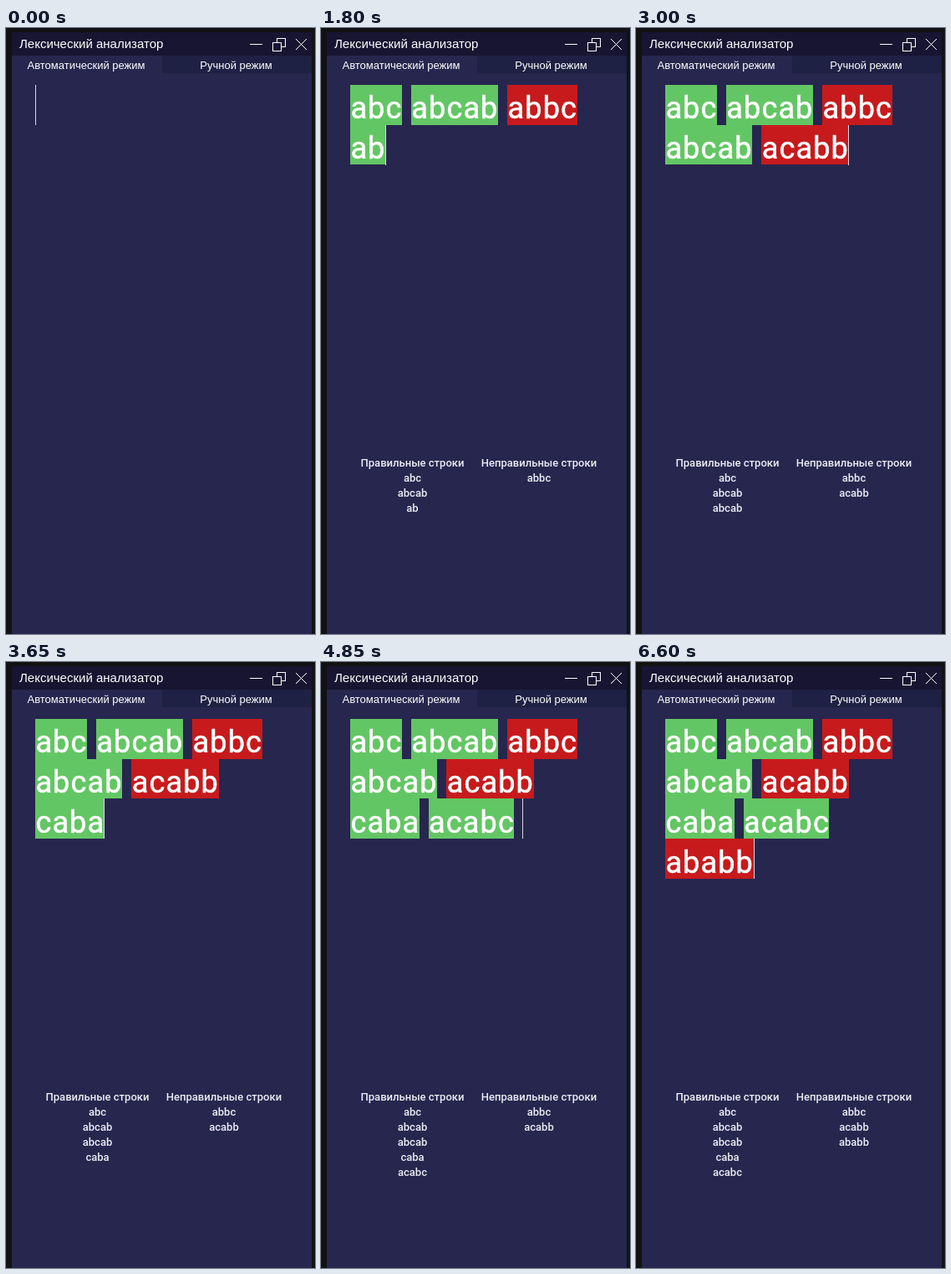
Write an HTML page that moves like this. It is 370 px wide and 724 px high and loops after 6.7 s.

```html
<!DOCTYPE html>
<html lang="ru">
<head>
<meta charset="utf-8">
<title>Лексический анализатор</title>
<style>
  html, body { margin: 0; width: 100%; height: 100%; overflow: hidden; background: #121214; }
  svg { display: block; }
  text { fill: #fff; }
  .ui { font-family: "Liberation Sans", Arial, sans-serif; }
  .word { font: 400 36px Roboto, sans-serif; letter-spacing: 1.15px; stroke: #fff; stroke-width: .6px; }
  .list text { font: 500 13px Roboto, sans-serif; text-anchor: middle; fill: #ececf4; }
  .icon { fill: none; stroke: #fff; shape-rendering: crispEdges; }
</style>
</head>
<body>
<svg width="370" height="724" viewBox="0 0 370 724">
  <rect width="370" height="724" fill="#121214"/>
  <rect x="7" y="5" width="359" height="719" fill="#27264e"/>
  <rect x="7" y="5" width="359" height="28" fill="#171531"/>
  <rect x="187" y="33" width="179" height="21" fill="#1e2143"/>
  <g class="ui">
    <text x="16" y="24" font-size="15">Лексический анализатор</text>
    <text x="96" y="49" font-size="13" text-anchor="middle">Автоматический режим</text>
    <text x="275.5" y="49" font-size="13" text-anchor="middle">Ручной режим</text>
  </g>
  <path class="icon" d="M292 19.5H307M319.5 17.5h10v10h-10zM324.5 17.5v-5h10v10h-5"/>
  <path d="M347 13l13 13M360 13l-13 13" fill="none" stroke="#fff"/>
  <g id="editor"></g>
  <g id="lists" class="list"></g>
  <rect id="caret" width="1" height="48" fill="#d8d8e0"/>
</svg>
<script>
const LOOP = 6700;
const SCRIPT = "abc abcab abbc abcab acabb caba acabc ababb";
const ADVANCE = { a: 20.8, b: 21.6, c: 19.5, " ": 11 };
const LEFT = 35, RIGHT = 338, TOP = 68, ROW = 47.7;
// Typing bursts: [first key time, interval, key count]
const BURSTS = [[50, 105, 17], [1860, 130, 9], [3050, 150, 12], [5050, 70, 2], [5850, 180, 3]];
const KEY_TIMES = BURSTS.flatMap(([start, step, count]) =>
  Array.from({ length: count }, (_, i) => start + i * step));

const byId = id => document.getElementById(id);
const editor = byId("editor"), lists = byId("lists"), caret = byId("caret");
const widthOf = word => [...word].reduce((sum, ch) => sum + ADVANCE[ch], 0);
const isValid = word => !word.includes("bb");

function layout(typed) {
  const words = [];
  let x = LEFT, row = 0;
  typed.split(" ").forEach((text, i) => {
    if (i) x += ADVANCE[" "];
    const width = widthOf(text);
    if (x + width > RIGHT) { x = LEFT; row++; }
    if (text) words.push({ text, x, y: TOP + row * ROW, width });
    x += width;
  });
  return { words, x, y: TOP + row * ROW };
}

function wordMarkup({ text, x, y, width }) {
  const left = Math.round(x), top = Math.round(y);
  const w = Math.round(x + width) - left, h = Math.round(y + ROW) - top;
  const color = isValid(text) ? "#63c664" : "#c71a1c";
  return `<rect x="${left}" y="${top}" width="${w}" height="${h}" fill="${color}"/>` +
    `<text class="word" x="${x + 0.4}" y="${y + 40.4}">${text}</text>`;
}

const column = (x, title, words) => [title, ...words]
  .map((text, i) => `<text x="${x}" y="${524 + 18 * i}">${text}</text>`).join("");

let shown = -1;
function draw(time) {
  const count = KEY_TIMES.filter(t => t <= time).length;
  if (count !== shown) {
    shown = count;
    const { words, x, y } = layout(SCRIPT.slice(0, count));
    const texts = words.map(word => word.text);
    editor.innerHTML = words.map(wordMarkup).join("");
    lists.innerHTML = count
      ? column(109.5, "Правильные строки", texts.filter(isValid)) +
        column(261, "Неправильные строки", texts.filter(word => !isValid(word)))
      : "";
    caret.setAttribute("x", Math.floor(x));
    caret.setAttribute("y", Math.round(y));
  }
  const blinkedOff = time >= 5650 && time < 5850;
  caret.setAttribute("visibility", blinkedOff ? "hidden" : "visible");
}

const start = performance.now();
function tick() {
  draw((performance.now() - start) % LOOP);
  requestAnimationFrame(tick);
}
draw(0);
requestAnimationFrame(tick);
</script>
</body>
</html>
```
